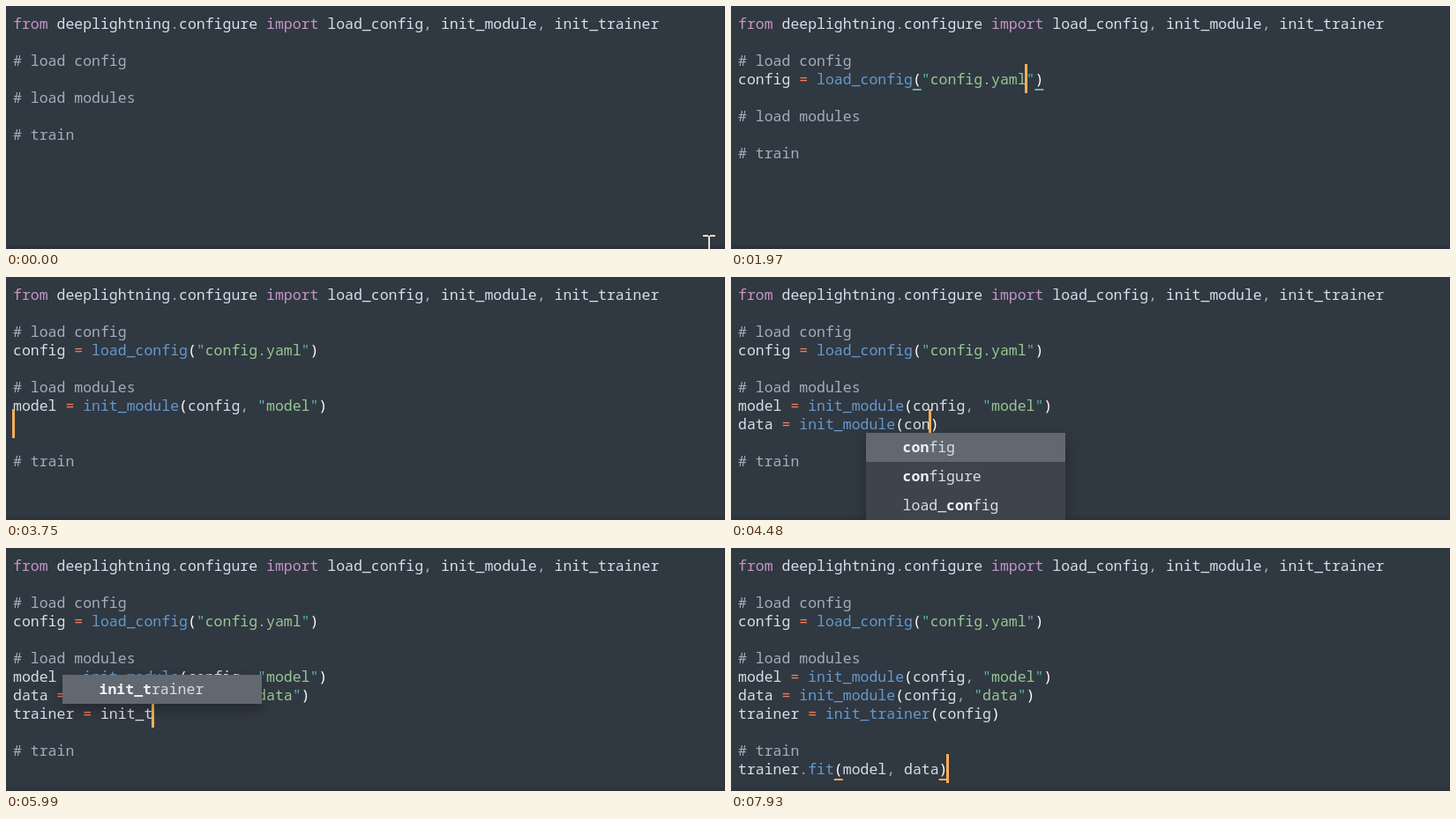
Recreate the animation shown at these times as an HTML page with a canvas. Size 815 px wide and 276 px high, loop 8 s.

```html
<!DOCTYPE html>
<html lang="en">
<head>
<meta charset="utf-8">
<title>Typing a training script</title>
<style>
  html, body { margin: 0; width: 100%; height: 100%; overflow: hidden; background: #303841; }
  canvas { display: block; }
</style>
</head>
<body>
<canvas id="stage" width="815" height="276"></canvas>
<script>
const ctx = document.getElementById('stage').getContext('2d');
const LOOP = 8000, LEFT = 8, CELL = 9.896, LINE = 21, ROW = 33, POPUP_WIDTH = 226;
const FONT = '16.5px "Noto Sans Mono", "DejaVu Sans Mono", monospace';
const COLOR = {
  back: '#303841', text: '#d8dee9', dim: '#a6acb9', keyword: '#c695c6', call: '#6699cc',
  string: '#99c794', accent: '#5fb4b4', operator: '#f97b58', bracket: '#ffffff',
  caret: '#f9ae58', popup: '#3d444d', selected: '#62686f'
};

const START = [
  'from deeplightning.configure import load_config, init_module, init_trainer',
  '', '# load config', '', '# load modules', '', '# train'
];
const WORDS = ['config', 'configure', 'load_config', 'init_module', 'init_trainer', 'import'];
const LAST_LINE = 11;

// [first key time, last key time, keys]
// ⇥ complete, ⇲ end of line, ↓ next line, ⇆ mark brackets
const TYPING = [
  [170, 840, '\nconfig = l'],
  [940, 1730, 'o⇥("config'],
  [1750, 1930, '.yaml'],
  [1970, 1970, '⇆'],
  [2000, 2470, '⇲↓↓⇲\nmod'],
  [2570, 3160, 'el = ini⇥(co'],
  [3260, 3360, 'n⇥'],
  [3390, 4190, ', "model⇲\ndata = ini⇥'],
  [4260, 4480, '(con'],
  [4580, 4990, '⇥, "data'],
  [5090, 5840, '⇲\ntrainer = init'],
  [5940, 5990, '_t'],
  [6090, 6690, '⇥(con⇥⇲↓↓⇲\n'],
  [6790, 7010, 'trainer'],
  [7110, 7500, '.fit(m'],
  [7600, 7900, '⇥, d⇥'],
  [7930, 7930, ')⇆']
];
const KEYS = TYPING.flatMap(([from, to, keys]) =>
  [...keys].map((key, i, all) => ({ key, time: from + (to - from) * i / Math.max(1, all.length - 1) })));

const xAt = col => LEFT + col * CELL;
const baseline = line => 26 + line * LINE;

function currentWord({ lines, line, col }) {
  return lines[line].slice(0, col).match(/\w*$/)[0];
}

function suggestions(state) {
  const word = currentWord(state);
  if (!word || word.length === state.col) return [];
  const before = state.lines[state.line].slice(0, state.col);
  const inString = before.split('"').length % 2 === 0;
  const words = inString ? ['config'] : state.line === LAST_LINE ? ['model', 'data'] : WORDS;
  return words.filter(w => new RegExp('(^|_)' + word).test(w));
}

function press(state, key) {
  const { lines, line, col } = state;
  const text = lines[line];
  const insert = (s, advance = s.length) => {
    lines[line] = text.slice(0, col) + s + text.slice(col);
    state.col += advance;
  };
  state.brackets = key === '⇆';
  if (key === '⇥') insert(suggestions(state)[0].slice(currentWord(state).length));
  else if (key === '⇲') state.col = text.length;
  else if (key === '↓') state.col = Math.min(col, lines[++state.line].length);
  else if (key === '\n') {
    lines.splice(++state.line, 0, '');
    state.col = 0;
  }
  else if (key === '(') insert('()', 1);
  else if ('")'.includes(key) && text[col] === key) state.col++;
  else if (key === '"') insert('""', 1);
  else if (key !== '⇆') insert(key);
  state.popup = /\w/.test(key);
}

function stateAt(time) {
  const state = { lines: [...START], line: 2, col: START[2].length, popup: false, brackets: false };
  for (const { key, time: at } of KEYS) if (at <= time) press(state, key);
  return state;
}

function rect(color, x, y, w, h) {
  ctx.fillStyle = color;
  ctx.fillRect(x, y, w, h);
}

// Places every character on the monospace grid.
function write(text, x, y, color) {
  ctx.fillStyle = color;
  [...text].forEach((char, i) => ctx.fillText(char, x + i * CELL, y));
}

function tokenColor(token, rest) {
  if (token[0] === '#') return COLOR.dim;
  if (token[0] === '"') return COLOR.string;
  if (token === 'from' || token === 'import') return COLOR.keyword;
  if (token === '=') return COLOR.operator;
  if (/[()]/.test(token)) return COLOR.bracket;
  if (/[.,]/.test(token)) return COLOR.dim;
  return rest[0] === '(' ? COLOR.call : COLOR.text;
}

function drawLine(text, line) {
  for (const { 0: token, index } of text.matchAll(/#.*|"[^"]*"?|\w+|\S/g)) {
    const color = tokenColor(token, text.slice(index + token.length));
    [...token].forEach((char, i) =>
      write(char, xAt(index + i), baseline(line), char === '"' ? COLOR.accent : color));
  }
}

function drawBrackets({ lines, line, col }) {
  const text = lines[line];
  const color = text[col - 1] === ')' ? COLOR.caret : COLOR.accent;
  for (const bracket of '()') rect(color, xAt(text.indexOf(bracket)), baseline(line) + 5, CELL, 2);
}

function drawPopup(state) {
  const rows = suggestions(state);
  if (!rows.length) return;
  const word = currentWord(state), wordX = xAt(state.col - word.length);
  const x = Math.round(wordX - 42.6), height = rows.length * ROW, base = baseline(state.line);
  const y = state.line === 8 ? base - 17 - height : base + 4;

  ctx.save();
  ctx.shadowColor = 'rgba(0, 0, 0, .28)';
  ctx.shadowBlur = 14;
  ctx.shadowOffsetY = 6;
  rect(COLOR.popup, x, y, POPUP_WIDTH, height);
  ctx.restore();
  rect(COLOR.selected, x, y, POPUP_WIDTH, ROW);

  rows.forEach((row, r) => {
    const match = row.search(new RegExp('(?<=^|_)' + word));
    [...row].forEach((char, i) => {
      const bold = i >= match && i < match + word.length;
      ctx.font = (bold ? 'bold ' : '') + FONT;
      write(char, wordX - 1.4 + i * CELL, y + r * ROW + 22, bold ? '#eef1f5' : COLOR.text);
    });
  });
}

function drawPointer() {
  const cream = '#e6dfc8';
  rect(cream, 790, 260, 6, 2);
  rect(cream, 798, 260, 6, 2);
  rect(cream, 796, 261, 2, 15);
}

function draw(time) {
  const state = stateAt(time);
  rect(COLOR.back, 0, 0, 815, 276);
  rect('#2c333c', 0, 272, 815, 4);
  rect('#2b323a', 814, 0, 1, 276);
  ctx.font = FONT;
  state.lines.forEach(drawLine);
  if (state.brackets) drawBrackets(state);
  if (time >= 100) rect(COLOR.caret, Math.round(xAt(state.col) - 1.5), baseline(state.line) - 23, 3, 33);
  else drawPointer();
  if (state.popup) drawPopup(state);
}

const begin = performance.now();
function tick() {
  draw((performance.now() - begin) % LOOP);
  requestAnimationFrame(tick);
}
tick();
</script>
</body>
</html>
```
